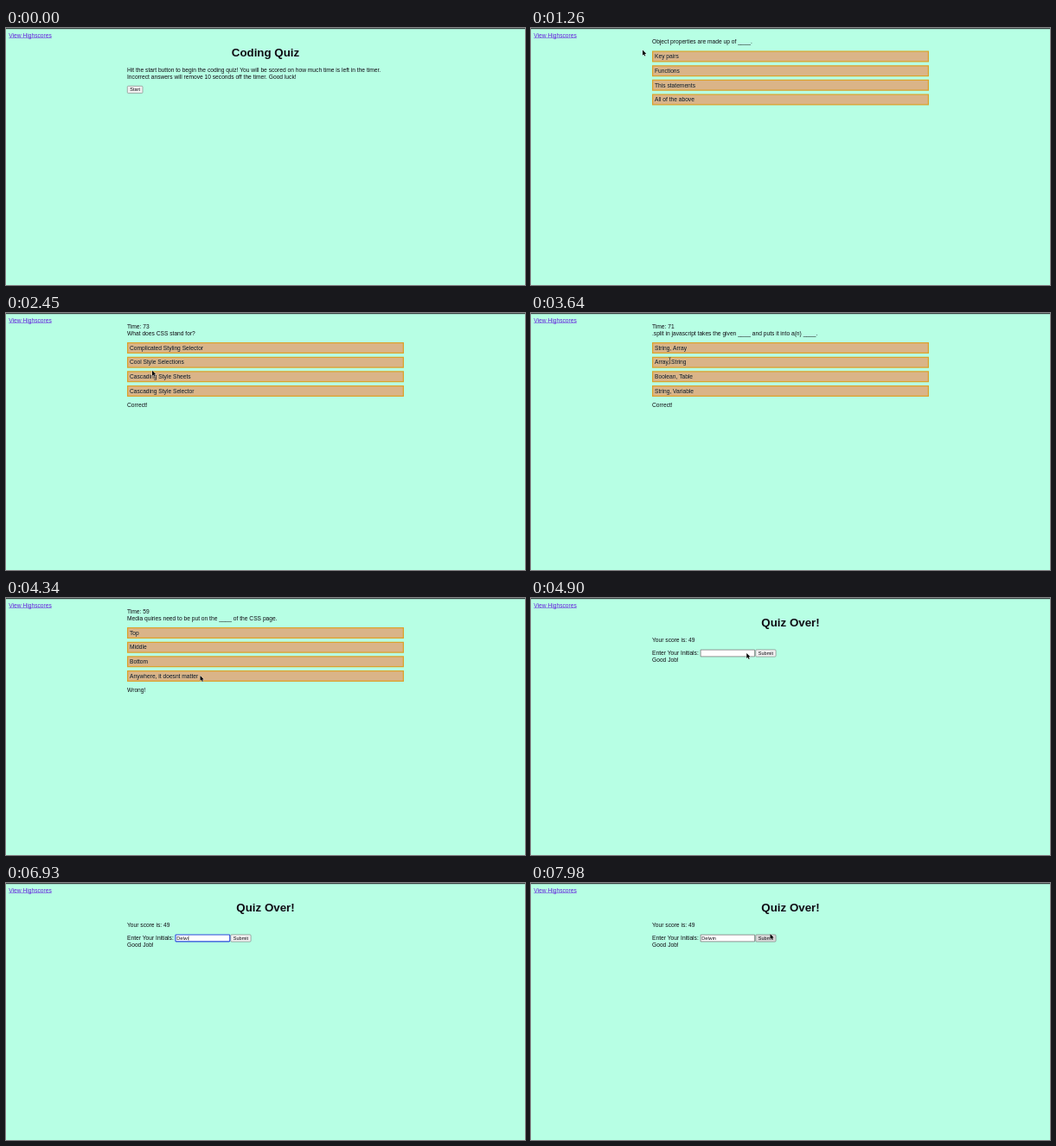
An HTML page with a canvas for the animation above (8000 ms loop, 600x298 px).

```html
<!DOCTYPE html>
<html lang="en">
<head>
<meta charset="utf-8">
<title>Coding Quiz</title>
<style>
  html, body { margin: 0; width: 600px; height: 298px; overflow: hidden; background: #b7ffe4; }
  canvas { display: block; width: 600px; height: 298px; }
</style>
</head>
<body>
<canvas></canvas>
<script>
const LOOP = 8000, LEFT = 140, LINE = 7.5;
const START = 970, TICK = 560, PENALTY = 3980, OVER = 4480, FOCUS = 5600, PRESS = 7910;
const BODY = 6.667, CONTROL = 5.556;
const PLAYER = 'Delwin';
const KEY_TIMES = [5945, 6225, 6435, 6645, 6925, 7135];

const QUESTIONS = [
  { at: START, text: 'Object properties are made up of ____.',
    options: ['Key pairs', 'Functions', 'This statements', 'All of the above'] },
  { at: 1680, text: 'What does CSS stand for?', feedback: 'Correct!',
    options: ['Complicated Styling Selector', 'Cool Style Selections', 'Cascading Style Sheets', 'Cascading Style Selector'] },
  { at: 2795, text: '.split in javascript takes the given ____ and puts it into a(n) ____.', feedback: 'Correct!',
    options: ['String, Array', 'Array, String', 'Boolean, Table', 'String, Variable'] },
  { at: PENALTY, text: 'Media quiries need to be put on the ____ of the CSS page.', feedback: 'Wrong!',
    options: ['Top', 'Middle', 'Bottom', 'Anywhere, it doesnt matter'] },
];

// Mouse path: time, x, y, cursor shape from that time on
const MOUSE = [
  [0, 205, 278, 'none'], [275, 205, 276, 'arrow'], [800, 149, 71, 'arrow'], [980, 149, 71, 'arrow'],
  [1250, 129, 25.6, 'arrow'], [1300, 129, 25.6, 'arrow'], [1540, 158, 38, 'arrow'], [1750, 158, 38, 'arrow'],
  [2420, 169, 66.8, 'arrow'], [2480, 169, 66.8, 'arrow'], [2700, 170, 74, 'text'], [3210, 170, 74, 'text'],
  [3600, 160.5, 55, 'text'], [4000, 160.5, 55, 'arrow'], [4300, 224.5, 90, 'arrow'], [4500, 224.5, 90, 'arrow'],
  [4830, 250, 64, 'arrow'], [5300, 238, 63, 'text'], [5560, 215.5, 63.3, 'text'], [5945, 215.5, 63.3, 'none'],
  [7345, 215.5, 63.3, 'text'], [7560, 250, 66, 'arrow'], [7840, 276.5, 59, 'arrow'], [LOOP, 276.5, 59, 'arrow'],
];

const canvas = document.querySelector('canvas');
const ctx = canvas.getContext('2d');
const ratio = window.devicePixelRatio || 1;
canvas.width = 600 * ratio;
canvas.height = 298 * ratio;

function text(str, x, y, { size = BODY, color = '#100c14', weight = 'normal', align = 'left' } = {}) {
  ctx.font = `${weight} ${size}px "Liberation Sans", Arial, sans-serif`;
  ctx.textAlign = align;
  ctx.fillStyle = color;
  ctx.fillText(str, x, y);
}

function box(x, y, w, h, fill, stroke, line, radius = 0) {
  ctx.beginPath();
  ctx.roundRect(x + line / 2, y + line / 2, w - line, h - line, radius);
  ctx.fillStyle = fill;
  ctx.fill();
  ctx.strokeStyle = stroke;
  ctx.lineWidth = line;
  ctx.stroke();
}

function button(label, x, y, w, h, pressed) {
  box(x, y, w, h, pressed ? '#d8d8d8' : '#f0f0f0', '#767676', 0.6, 1.2);
  text(label, x + w / 2, y + h / 2 + 2, { size: CONTROL, align: 'center' });
}

const title = str => text(str, 300, 32.8, { size: 13.333, weight: 'bold', align: 'center' });

function drawPage() {
  ctx.fillStyle = '#b7ffe4';
  ctx.fillRect(0, 0, 600, 298);
  ctx.fillStyle = '#3b4444';
  ctx.fillRect(0, 0, 600, 1.2);
  const link = 'View Highscores', color = '#6420dc';
  text(link, 3.3, 10.5, { color });
  ctx.fillRect(3.3, 11.1, ctx.measureText(link).width, 0.5);
}

function drawIntro() {
  title('Coding Quiz');
  text('Hit the start button to begin the coding quiz! You will be scored on how much time is left in the timer.', LEFT, 51.3);
  text('Incorrect answers will remove 10 seconds off the timer. Good luck!', LEFT, 58.8);
  button('Start', LEFT, 67, 18.3, 8.9);
}

function drawQuestion(t) {
  const question = QUESTIONS.findLast(q => t >= q.at);
  const ticks = Math.floor((t - START) / TICK);
  const top = ticks ? LINE : 0;
  if (ticks) text('Time: ' + (75 - ticks - (t >= PENALTY ? 10 : 0)), LEFT, 18.1);
  text(question.text, LEFT, 18.1 + top);
  question.options.forEach((option, i) => {
    const y = 26.5 + top + i * 16.667;
    box(LEFT, y, 320, 13, '#dab488', '#dca22c', 1.25);
    ctx.shadowColor = 'rgba(195, 235, 225, .6)';
    ctx.shadowBlur = ratio;
    text(option, 143, y + 8.7);
    ctx.shadowColor = 'transparent';
  });
  if (question.feedback) text(question.feedback, LEFT, 101.9 + top);
}

function drawResult(t) {
  const focused = t >= FOCUS && t < PRESS;
  const typed = PLAYER.slice(0, KEY_TIMES.filter(k => t >= k).length);
  title('Quiz Over!');
  text('Your score is: 49', LEFT, 51.3);
  text('Enter Your Initials:', LEFT, 65.9);
  text('Good Job!', LEFT, 74.3);
  button('Submit', 259.4, 59.6, 24, 8.8, t >= PRESS);
  if (focused) box(195.4, 59.4, 63.9, 9, '#fff', '#2a48dc', 1.1, 0.8);
  else box(195.7, 59.7, 63.3, 8.6, '#fff', '#767676', 0.8);
  text(typed, 197.3, 65.9, { size: CONTROL });
  const idle = t - (KEY_TIMES.findLast(k => t >= k) ?? FOCUS - 420);
  if (focused && idle % 1000 < 500) {
    ctx.fillRect(197.3 + ctx.measureText(typed).width, 61.3, 0.4, 5.4);
  }
}

const ARROW = new Path2D('M0 0V6.1L1.4 4.8L2.4 7L3.4 6.6L2.4 4.4H4.3Z');
const BEAM = new Path2D('M-1.2-3.4Q0-3.4 0-2.5Q0-3.4 1.2-3.4M0-2.6V2.6M-1.2 3.4Q0 3.4 0 2.5Q0 3.4 1.2 3.4');

function drawMouse(t) {
  const i = MOUSE.findLastIndex(key => t >= key[0]);
  const [t0, x0, y0, shape] = MOUSE[i];
  const [t1, x1, y1] = MOUSE[i + 1];
  if (shape === 'none') return;
  const p = (t - t0) / (t1 - t0), ease = p * p * (3 - 2 * p);
  ctx.save();
  ctx.translate(x0 + (x1 - x0) * ease, y0 + (y1 - y0) * ease);
  if (shape === 'arrow') {
    ctx.strokeStyle = '#fff';
    ctx.lineWidth = 0.7;
    ctx.stroke(ARROW);
    ctx.fillStyle = '#000';
    ctx.fill(ARROW);
  } else {
    ctx.strokeStyle = '#333';
    ctx.lineWidth = 0.7;
    ctx.stroke(BEAM);
  }
  ctx.restore();
}

function frame() {
  const t = performance.now() % LOOP;
  ctx.setTransform(ratio, 0, 0, ratio, 0, 0);
  drawPage();
  if (t < START) drawIntro();
  else if (t < OVER) drawQuestion(t);
  else drawResult(t);
  drawMouse(t);
  requestAnimationFrame(frame);
}
frame();
</script>
</body>
</html>
```
